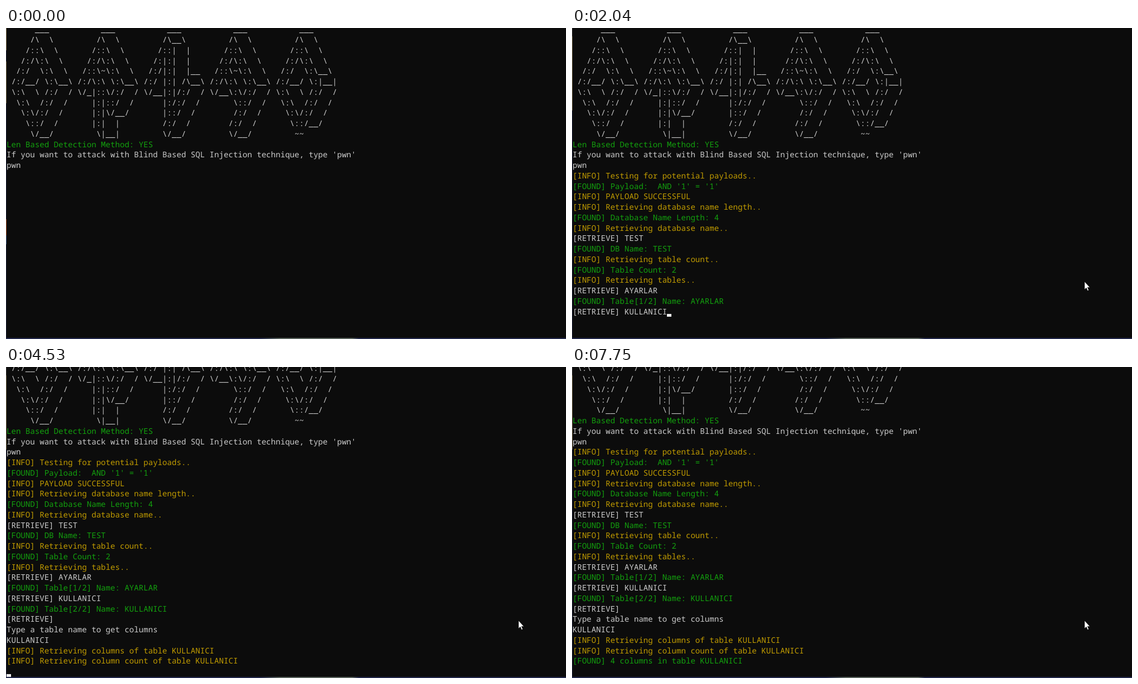
Animation of 1003x558 px, one loop 8 s. Source, as an HTML page:

```html
<!DOCTYPE html>
<html lang="en">
<head>
<meta charset="utf-8">
<title>Terminal session</title>
<style>
  html, body { margin: 0; width: 100%; height: 100%; overflow: hidden; background: #0c0c0c; }
  #stage { position: relative; width: 1003px; height: 558px; overflow: hidden; background: #0c0c0c; }
  #stage > * { position: absolute; }
  #window { left: 1px; top: 0; width: 1002px; height: 556px; overflow: hidden; }
  #lines {
    position: absolute; margin: 0; left: 0; padding-top: 1.2px; color: #ccc;
    font: 500 14.1px/18.76px "Noto Sans Mono", "DejaVu Sans Mono", monospace;
    font-variant-ligatures: none; text-rendering: geometricPrecision;
  }
  #lines div { height: 18.76px; white-space: pre; }
  .info { color: #c19c00; }
  .found { color: #13a10e; }
  #caret { position: absolute; width: 8px; height: 5px; background: #f2f2f2; }
  #edge { left: 0; top: 0; width: 1px; height: 556px;
    background: linear-gradient(#8a7a58 40px, #23263c 0 60px, #75684c 0 135px, #1c2036 0 343px,
      #a4502c 0 372px, #45608a 0 388px, #1c2036 0); }
  #edge.dim { background: linear-gradient(#3c3a3a 15px, #75684c 0 148px, #1c2036 0); }
  #base { left: 0; top: 556px; width: 1003px; height: 2px;
    background: linear-gradient(90deg, #22284a 455px, #58625c 490px 620px, #22284a 632px); }
  #mouse { left: 917px; top: 454px; }
</style>
</head>
<body>
<div id="stage">
  <div id="window"><div id="lines"></div><div id="caret"></div></div>
  <div id="edge"></div>
  <div id="base"></div>
  <svg id="mouse" width="14" height="20"><path d="M1 1V15.3L4.2 12.3 6.4 17.4 8.6 16.5 6.4 11.4H10.6Z" fill="#fff" stroke="#000" stroke-width=".6"/></svg>
</div>
<script>
const LOOP = 8000, CELL = 8.46, ROW = 18.76, TOP = -6.8, LAST_ROW = 29;
const $ = id => document.getElementById(id);

// Banner letters, 14 columns each
const glyphs = {
A: String.raw`      ___
     /\  \
    /::\  \
   /:/\:\  \
  /::\~\:\  \
 /:/\:\ \:\__\
 \/__\:\/:/  /
      \::/  /
      /:/  /
     /:/  /
     \/__/`,
N: String.raw`      ___
     /\__\
    /::|  |
   /:|:|  |
  /:/|:|  |__
 /:/ |:| /\__\
 \/__|:|/:/  /
     |:/:/  /
     |::/  /
     /:/  /
     \/__/`,
D: String.raw`      ___
     /\  \
    /::\  \
   /:/\:\  \
  /:/  \:\__\
 /:/__/ \:|__|
 \:\  \ /:/  /
  \:\  /:/  /
   \:\/:/  /
    \::/__/
     ~~`,
O: String.raw`      ___
     /\  \
    /::\  \
   /:/\:\  \
  /:/  \:\  \
 /:/__/ \:\__\
 \:\  \ /:/  /
  \:\  /:/  /
   \:\/:/  /
    \::/  /
     \/__/`,
R: String.raw`      ___
     /\  \
    /::\  \
   /:/\:\  \
  /::\~\:\  \
 /:/\:\ \:\__\
 \/_|::\/:/  /
    |:|::/  /
    |:|\/__/
    |:|  |
     \|__|`
};
const letters = [..."ORNAD"].map(c => glyphs[c].split("\n"));
const banner = letters[0].map((_, i) => letters.map(g => g[i].padEnd(14)).join(""));

const text = [...banner, ...`Len Based Detection Method: YES
If you want to attack with Blind Based SQL Injection technique, type 'pwn'
pwn
[INFO] Testing for potential payloads..
[FOUND] Payload:  AND '1' = '1'
[INFO] PAYLOAD SUCCESSFUL
[INFO] Retrieving database name length..
[FOUND] Database Name Length: 4
[INFO] Retrieving database name..
[RETRIEVE] TEST
[FOUND] DB Name: TEST
[INFO] Retrieving table count..
[FOUND] Table Count: 2
[INFO] Retrieving tables..
[RETRIEVE] AYARLAR
[FOUND] Table[1/2] Name: AYARLAR
[RETRIEVE] KULLANICI
[FOUND] Table[2/2] Name: KULLANICI
[RETRIEVE]
Type a table name to get columns
KULLANICI
[INFO] Retrieving columns of table KULLANICI
[INFO] Retrieving column count of table KULLANICI
[FOUND] 4 columns in table KULLANICI
`.split("\n")];

// Output progress: time, caret row, caret column
const steps = [
  [0, 13, 3], [200, 18, 0], [410, 20, 13], [610, 23, 0], [820, 25, 13], [1020, 25, 15],
  [1240, 25, 18], [1420, 27, 12], [1640, 27, 15], [1840, 27, 18], [2040, 27, 20],
  [2240, 31, 0], [2870, 31, 1], [3060, 31, 2], [3490, 31, 3], [3700, 31, 5],
  [3910, 31, 6], [4120, 31, 8], [4330, 31, 9], [4530, 34, 0], [4700, 35, 0]
];
const caretOff = [[0, 200], [5710, 6130], [6730, 7150], [7750, LOOP]];

const rows = text.map(line => {
  const div = document.createElement("div");
  div.className = /^\[INFO/.test(line) ? "info" : /^(\[FOUND|Len)/.test(line) ? "found" : "";
  return $("lines").appendChild(div);
});

let shown;
function draw(t) {
  const step = steps.findLast(s => s[0] <= t);
  const [, row, col] = step;
  if (step !== shown) {
    shown = step;
    const scroll = Math.max(0, row - LAST_ROW);
    rows.forEach((div, i) => {
      div.textContent = i < row ? text[i] : i === row ? text[i].slice(0, col) : "";
    });
    $("lines").style.top = TOP - scroll * ROW + "px";
    $("caret").style.left = col * CELL + "px";
    $("caret").style.top = Math.round(TOP + (row - scroll + 1) * ROW) - 5 + "px";
  }
  $("caret").hidden = caretOff.some(([a, b]) => t >= a && t < b);
  $("mouse").style.display = t < 200 ? "none" : "";
  $("edge").className = t < 200 ? "" : "dim";
}

const start = performance.now();
function tick() {
  draw((performance.now() - start) % LOOP);
  requestAnimationFrame(tick);
}
tick();
</script>
</body>
</html>
```
